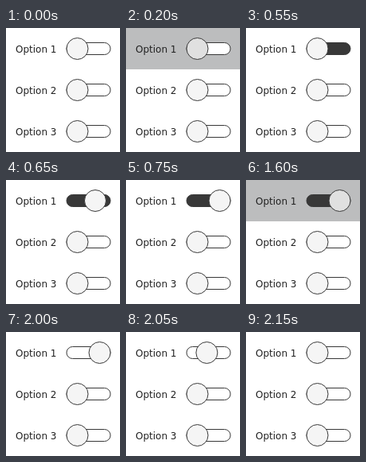
An HTML page that plays this animation: 143 px wide and 156 px high, repeating every 5000 ms.

```html
<!DOCTYPE html>
<html lang="en">
<head>
<meta charset="utf-8">
<title>Option switches</title>
<style>
  html, body { margin: 0; width: 100%; height: 100%; overflow: hidden; background: #fff; }
  svg { display: block; }
  text { font: 12px "DejaVu Sans", sans-serif; fill: #222; }
  .back { fill: none; }
  .track, .thumb { stroke: #383838; }
  .track { fill: #fff; }
  .thumb { fill: #f5f5f5; }
  .on .track { fill: #383838; }
  .hover .back { fill: #bcbdbe; }
  .hover .thumb { fill: #e0e0e0; }
</style>
</head>
<body>
<svg width="143" height="156"></svg>
<script>
const LOOP = 5000, STEP = 50, LEFT = 89.5, TRAVEL = 28;
const svg = document.querySelector('svg');

svg.innerHTML = [1, 2, 3].map(n => `
  <g transform="translate(0 ${(n - 1) * 52})">
    <rect class="back" width="143" height="52"/>
    <text x="12" y="31">Option ${n}</text>
    <rect class="track" x="76" y="18.5" width="55" height="15" rx="7.5"/>
    <circle class="thumb" cx="${LEFT}" cy="26" r="13.5"/>
  </g>`).join('');

const row = svg.querySelector('g');
const thumb = row.querySelector('.thumb');

const bezier = (a, b, u) => 3 * a * u * (1 - u) ** 2 + 3 * b * u * u * (1 - u) + u ** 3;

// The CSS "ease" curve, solved by bisection
function ease(p) {
  if (p <= 0) return 0;
  if (p >= 1) return 1;
  let lo = 0, hi = 1;
  for (let i = 0; i < 20; i++) {
    const mid = (lo + hi) / 2;
    if (bezier(.25, .25, mid) < p) lo = mid; else hi = mid;
  }
  return bezier(.1, 1, lo);
}

function draw(now) {
  const t = now % LOOP;
  const s = Math.floor(t / STEP) * STEP;
  const within = (from, to) => t >= from && t < to;
  row.classList.toggle('hover', within(200, 550) || within(1600, 2000));
  row.classList.toggle('on', within(550, 2000));
  const x = ease((s - 550) / 200) - ease((s - 2000) / 150);
  thumb.setAttribute('cx', LEFT + x * TRAVEL);
}

const start = performance.now();
function tick() {
  draw(performance.now() - start);
  requestAnimationFrame(tick);
}
tick();
</script>
</body>
</html>
```
